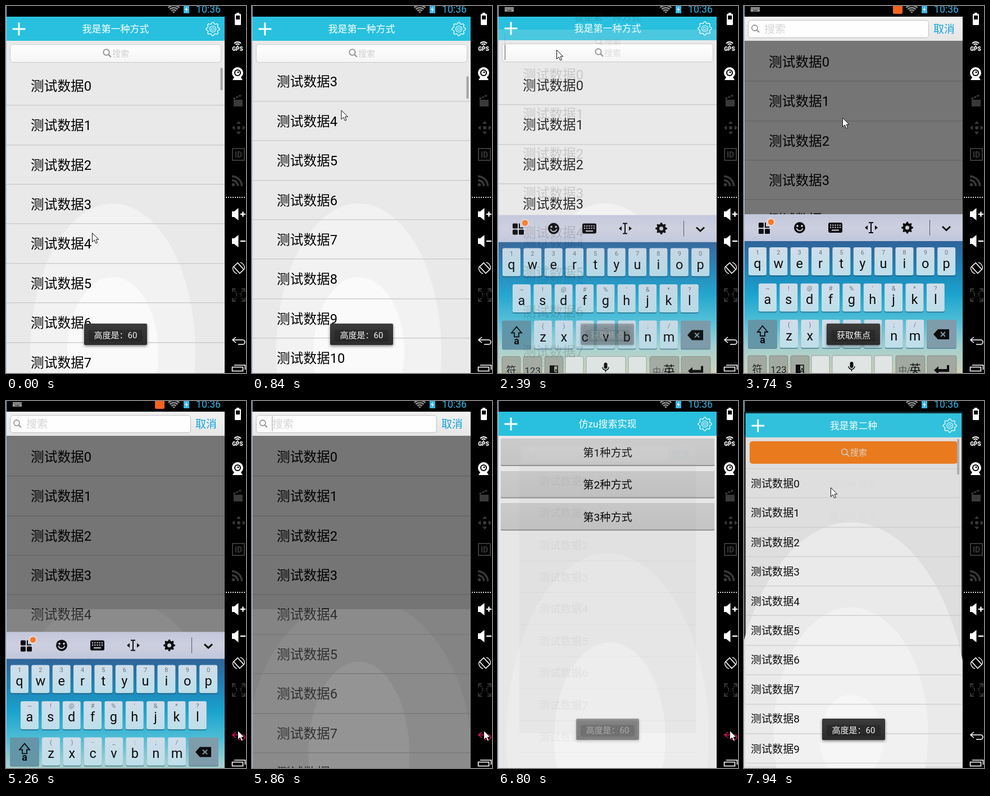
Animation, 427 px wide and 654 px high, one loop 8 s. Source, as an HTML page with a canvas:

```html
<!DOCTYPE html>
<html lang="zh-CN">
<head>
<meta charset="utf-8">
<title>Search bar demo</title>
<style>
html, body { margin: 0; width: 100%; height: 100%; overflow: hidden; background: #000; }
canvas { display: block; width: 427px; height: 654px; }
</style>
</head>
<body>
<canvas id="stage" width="427" height="654"></canvas>
<script>
const g = document.getElementById('stage').getContext('2d');
const FONT = 'Roboto, "Noto Sans CJK SC", "Noto Sans CJK", sans-serif';
// The traditional face centres the full-width colon.
const TOAST_FONT = 'Roboto, "Noto Sans CJK TC", "Noto Sans CJK", sans-serif';
const LOOP = 8000, TAU = Math.PI * 2;

// The screen refreshes only at these moments.
const TICKS = [0, 120, 260, 400, 540, 680, 820, 960, 1100, 1260, 1410, 1540, 1680, 1820, 1960,
  2100, 2240, 2390, 2540, 2680, 2810, 3210, 3740, 3880, 4020, 4160, 4300, 4440, 4580, 4730,
  5260, 5410, 5560, 5710, 5860, 6000, 6130, 6400, 6530, 6660, 6800, 6940, 7080, 7220, 7370,
  7520, 7660, 7800, 7940];

const POINTER = [[60, 153, 404], [680, 158, 91], [1260, 160, 482], [1410, 160, 482],
  [1960, 104, 78], [2390, 104, 78], [2810, 175, 199], [3740, 175, 199], [4730, 412, 587],
  [6800, 412, 587], [7370, 154, 154]];

const ramp = (t, a, b) => Math.min(1, Math.max(0, (t - a) / (b - a)));
const easeOut = u => 1 - (1 - u) ** 2;

function along(path, t) {
  let a = path[0];
  for (const b of path) {
    if (t < b[0]) {
      const u = ramp(t, a[0], b[0]);
      return [a[1] + (b[1] - a[1]) * u, a[2] + (b[2] - a[2]) * u];
    }
    a = b;
  }
  return [a[1], a[2]];
}

function box(x, y, w, h, fill) {
  g.fillStyle = fill;
  g.fillRect(x, y, w, h);
}
function round(x, y, w, h, r, fill, line) {
  g.beginPath();
  g.roundRect(x, y, w, h, r);
  if (fill) { g.fillStyle = fill; g.fill(); }
  if (line) { g.strokeStyle = line; g.lineWidth = 1; g.stroke(); }
}
function oval(x, y, rx, ry, fill) {
  g.beginPath();
  g.ellipse(x, y, rx, ry, 0, 0, TAU);
  g.fillStyle = fill;
  g.fill();
}
function poly(pts, fill) {
  g.beginPath();
  for (let i = 0; i < pts.length; i += 2) g.lineTo(pts[i], pts[i + 1]);
  g.closePath();
  g.fillStyle = fill;
  g.fill();
}
function line(pts, color, w = 1) {
  g.beginPath();
  for (let i = 0; i < pts.length; i += 2) g.lineTo(pts[i], pts[i + 1]);
  g.strokeStyle = color;
  g.lineWidth = w;
  g.stroke();
}
function arc(x, y, r, a, b, color, w) {
  g.beginPath();
  g.arc(x, y, r, a, b);
  g.strokeStyle = color;
  g.lineWidth = w;
  g.stroke();
}
function text(s, x, y, size, color, align = 'left', weight = 400, font = FONT) {
  g.font = `${weight} ${size}px ${font}`;
  g.textAlign = align;
  g.fillStyle = color;
  g.fillText(s, x, Math.round(y + size * 0.37));
}
function fade(stops, y0, y1) {
  const f = g.createLinearGradient(0, y0, 0, y1);
  stops.forEach((c, i) => f.addColorStop(i / (stops.length - 1), c));
  return f;
}
function layer(alpha, draw) {
  if (alpha <= 0) return;
  g.save();
  g.globalAlpha *= alpha;
  draw();
  g.restore();
}
function clip(x, y, w, h) {
  g.beginPath();
  g.rect(x, y, w, h);
  g.clip();
}
function zoom(s) {
  g.translate(195, 327);
  g.scale(s, s);
  g.translate(-195, -327);
}

function gear(x, y, r, teeth, depth) {
  g.beginPath();
  for (let i = 0; i < teeth * 4; i++) {
    const a = (i - 0.5) / (teeth * 4) * TAU, d = i % 4 < 2 ? r : r - depth;
    g.lineTo(x + d * Math.cos(a), y + d * Math.sin(a));
  }
  g.closePath();
}
function lens(x, y, r, color, w) {
  arc(x, y, r, 0, TAU, color, w);
  line([x + r * 0.7, y + r * 0.7, x + r * 1.6, y + r * 1.6], color, w + 0.5);
}

function titleBar(title) {
  box(1, 19, 388, 43, '#28c0de');
  line([11.5, 41, 34.5, 41], '#fff', 3);
  line([23, 29.5, 23, 52.5], '#fff', 3);
  gear(368, 41, 12, 8, 2.5);
  g.strokeStyle = '#fff';
  g.lineWidth = 1.3;
  g.stroke();
  arc(368, 41, 5.5, 0, TAU, '#fff', 1.2);
  arc(368, 41, 2.5, 0, TAU, '#fff', 1);
  text(title, 195, 41, 17, '#fff', 'center');
}

function rows(x, y, pitch, size, count, ink, rule) {
  for (let i = 0; i < count; i++) {
    const cy = y + i * pitch;
    text('测试数据' + i, x, cy, size, ink);
    if (rule) box(1, Math.round(cy + pitch / 2 - 1), 388, 1.5, rule);
  }
}

function firstPage(scroll, shift, ink, focused) {
  box(1, 19, 388, 635, '#e9e9e9');
  oval(190, 617, 147, 265, '#f2f2f2');
  oval(190, 617, 81, 134, '#fafafa');
  g.save();
  clip(1, 105 + shift, 388, 560);
  rows(44, 142 + shift - scroll, 70.4, 23.7, 16, ink, '#cdcdcd');
  g.restore();
  if (!focused) round(381.5, 110 + scroll * 0.07, 4, 40, 1.5, '#a6a6a6');
  g.save();
  g.translate(0, shift);
  titleBar('我是第一种方式');
  round(7.5, 68.5, 375, 32, 5, fade(['#fff', '#f5f5f5'], 68, 100), '#c9c9c9');
  lens(178.5, 82.5, 5.2, '#999', 2);
  text('搜索', 189, 84, 15, focused ? '#dcdcdc' : '#cfcfcf');
  if (focused) box(12, 70, 1, 27, '#555');
  g.restore();
}

function focusGhost() {
  box(1, 42, 388, 20, '#e9e9e9');
  text('我是第一种方式', 195, 20, 17, '#333', 'center');
  text('搜索', 189, 63, 15, '#888');
  lens(178.5, 62, 5.2, '#888', 2);
  box(12, 50, 1, 20, '#333');
  rows(44, 122, 70.4, 23.7, 8, '#333');
}

function searchPage(t, caret) {
  box(1, 62, 388, 592, '#757575');
  rows(44, 99, 70.4, 23.7, 9, '#000', '#666');
  if (t < 6000) {
    g.save();
    clip(1, 371, 388, 283);
    box(1, 371, 388, 283, '#848484');
    oval(190, 630, 200, 280, '#8b8b8b');
    oval(190, 630, 90, 166, '#949494');
    rows(44, 99, 70.4, 23.7, 9, '#303030', '#7a7a7a');
    g.restore();
  }
  box(1, 19, 388, 43, fade(['#f2f2f2', '#e6e6e6'], 19, 62));
  round(7.5, 25.5, 321, 31, 5, '#fefefe', '#bdbdbd');
  lens(19, 39, 5, '#999', 1.8);
  text('搜索', 36, 41, 19, '#d4d4d4');
  text('取消', 337, 41, 19, '#12a3dc');
  if (caret) box(35.5, 27, 1, 27, '#999');
}

function menuPage() {
  box(1, 19, 388, 635, '#e7e7e7');
  oval(195, 600, 180, 328, '#ececec');
  oval(199, 600, 99, 170, '#f3f3f3');
  titleBar('仿zu搜索实现');
  for (let i = 0; i < 3; i++) {
    const y = 67.5 + i * 57.5;
    round(5, y, 380, 48.5, 2, '#929292');
    round(5, y, 380, 46.5, 2, fade(['#cbcbcb', '#c4c4c4'], y, y + 46));
    text(`第${i + 1}种方式`, 195, y + 24, 19.2, '#000', 'center');
  }
}

function secondPage() {
  box(1, 19, 388, 635, '#e8e8e8');
  oval(190, 600, 215, 385, '#ebebeb');
  oval(190, 595, 139, 227, '#f2f2f2');
  oval(191, 604, 57, 79, '#f7f7f7');
  titleBar('我是第二种');
  round(8, 69, 374, 40.5, 5, '#ea7514');
  lens(178.5, 88, 5.2, '#c9c3bd', 2);
  text('搜索', 189, 89.5, 15, '#ddd8d2');
  box(1, 117.5, 388, 1.2, '#cfcfcf');
  rows(10, 144.5, 53.1, 19.3, 10, '#000', '#cfcfcf');
  round(381, 65, 4, 64, 1.5, '#aaa');
}

function statusBar(t) {
  box(1, 0, 388, 19, '#000');
  for (let i = 0; i < 4; i++) arc(298.5, 13, 2 + i * 4, -2.35, -0.79, '#8d8d8d', 2.6);
  box(316, 0, 10, 13, '#33b5e5');
  poly([322, 1, 318, 7, 321, 7, 319.5, 12, 324, 5.5, 321, 5.5], '#e8f7fd');
  text('10:36', 338, 5.6, 17.7, '#33b5e5');
  if (t >= 2240 && t < 5410) {
    box(12, 2, 16, 8, '#a0a0a0');
    for (let i = 0; i < 10; i++) box(13.5 + i % 5 * 3, 3.5 + (i / 5 | 0) * 2, 1.2, 1, '#000');
    box(16, 7.6, 8, 1, '#000');
  }
  if (t >= 2540 && t < 5410) round(265, -2, 17, 16, 2, '#f4631e');
}

function key(x, y, w, label, hint, fill) {
  round(x, y + 1, w, 51, 3, 'rgba(20,60,90,.45)');
  round(x, y, w, 50, 3, fill || fade(['#d0dde9', '#bddfea'], y, y + 50));
  const cx = x + w / 2;
  if (hint) text(hint, cx, y + 8.5, 11, '#667986', 'center');
  if (label) text(label, cx, y + 28, 23.5, '#0b0b0b', 'center');
}

function keyboard() {
  const PITCH = 37.35, W = 32;
  box(1, 419, 388, 240,
    fade(['#2f6399', '#2080b4', '#1aa3cd', '#4dbdd6', '#a3d0d0', '#cfd0b6'], 419, 654));
  box(1, 371, 388, 48, fade(['#c3c7db', '#cdcfdf', '#c0c7dc'], 371, 419));

  const ink = '#0c0c0c', tray = '#cbcddd';
  for (const [x, y] of [[26, 386], [26, 397], [37, 397]]) round(x, y, 9, 9, 1.5, ink);
  line([38, 386, 38, 394, 45, 394], ink, 2);
  oval(48, 385, 6.5, 6.5, '#fff');
  oval(48, 385, 5.5, 5.5, '#f47a2c');
  oval(99, 395, 10, 10, ink);
  oval(95, 392, 1.8, 2, tray);
  oval(103, 392, 1.8, 2, tray);
  arc(99, 395, 5.5, 0.2, 2.94, tray, 2);
  round(150, 386, 25, 18, 3, ink);
  for (let i = 0; i < 10; i++) box(153 + i % 5 * 4.2, 389.5 + (i / 5 | 0) * 4, 2.2, 2, tray);
  box(156, 398.5, 13, 2, tray);
  line([222, 386, 230, 386], ink, 2);
  line([226, 386, 226, 404], ink, 2);
  line([222, 404, 230, 404], ink, 2);
  poly([215, 395, 220, 391, 220, 399], ink);
  poly([238, 395, 233, 391, 233, 399], ink);
  gear(290.5, 395, 10.5, 8, 2.5);
  g.fillStyle = ink;
  g.fill();
  oval(290.5, 395, 3.5, 3.5, tray);
  box(330, 381, 1, 28, '#555');
  line([353, 393, 360, 399.5, 367, 393], ink, 3);

  [...'qwertyuiop'].forEach((c, i) => key(8 + i * PITCH, 430, W, c, '1234567890'[i]));
  [...'asdfghjkl'].forEach((c, i) => key(26 + i * PITCH, 494.5, W, c, "~!@#%'&*?"[i]));
  [...'zxcvbnm'].forEach((c, i) => key(64 + i * PITCH, 559, W, c, '()-_:;/'[i]));
  key(7, 559, 52, '', '', '#6496a8');
  g.beginPath();
  [33, 570, 42, 581, 37, 581, 37, 588, 29, 588, 29, 581, 24, 581].forEach((v, i, p) => {
    if (i % 2) g.lineTo(p[i - 1], v);
  });
  g.closePath();
  g.strokeStyle = ink;
  g.lineWidth = 1.8;
  g.stroke();
  text('a', 33, 594, 18, ink, 'center', 700);
  const del = '#7f9cab';
  key(325, 559, 53, '', '', del);
  poly([337, 585, 345, 576, 365, 576, 365, 594, 345, 594], ink);
  line([350, 581, 358, 589], del, 2);
  line([358, 581, 350, 589], del, 2);

  const y = 623;
  for (const [x, w, dark] of [[7, 33, 1], [45, 33, 1], [83, 33, 1], [120, 32], [157, 70],
    [232, 32], [270, 52, 1], [326, 52, 1]]) {
    round(x, y, w, 50, 3, dark ? '#a2a9a1' : '#e0e5e4', 'rgba(90,110,110,.5)');
  }
  text('符', 23.5, 647, 18, '#222', 'center');
  text('123', 61.5, 648, 17, '#222', 'center');
  box(92, 639, 8, 17, ink);
  text('A', 99, 649, 13, ink);
  line([100, 640, 106, 640, 106, 656], ink, 1.5);
  round(188.5, 634, 6, 11, 3, ink);
  arc(191.5, 642, 5.5, 0, Math.PI, ink, 1.5);
  line([191.5, 647, 191.5, 651], ink, 1.5);
  text('中/', 275, 648, 15, '#555');
  text('英', 294, 646, 21, ink, 'left', 500);
  poly([338, 649, 346, 642, 346, 647, 361, 647, 361, 640, 365, 640, 365, 652, 346, 652, 346, 656], ink);
}

function toast(label, x, w) {
  g.save();
  g.shadowColor = 'rgba(0,0,0,.5)';
  g.shadowBlur = 5;
  g.shadowOffsetY = 2;
  round(x, 566, w, 38, 2, fade(['#3b3b3b', '#2c2c2c'], 566, 604));
  g.restore();
  round(x + 8, 577, w - 16, 21, 4, 'rgba(20,20,20,.3)');
  text(label, 195, 586, 15, '#f4f4f4', 'center', 400, TOAST_FONT);
}

function speaker(y, plus) {
  poly([402, y - 5, 406, y - 5, 413.5, y - 11, 413.5, y + 11, 406, y + 5, 402, y + 5], '#fff');
  line([417, y, 426, y], '#fff', 2.4);
  if (plus) line([421.5, y - 4.5, 421.5, y + 4.5], '#fff', 2.4);
}

function sidePanel(hot) {
  const on = '#fff', off = '#393939';
  box(389, 0, 38, 654, '#000');
  box(410, 12, 5, 3, on);
  round(407, 14, 11, 20, 1.5, on);
  box(409, 17, 7, 7, '#000');
  for (const r of [1, 4.5, 8]) arc(412, 72, r, -2.4, -0.74, on, 2);
  text('GPS', 412, 76.5, 10, on, 'center', 900);
  oval(412, 119, 10, 10, on);
  oval(412, 119, 6, 6, '#000');
  oval(412, 119, 4, 4, on);
  oval(413, 118, 1.5, 1.5, '#000');
  poly([406, 127, 418, 127, 421, 132, 403, 132], on);

  box(405, 167, 16, 12, off);
  poly([404, 164, 419, 157, 420, 160, 405, 167], off);
  for (let i = 0; i < 3; i++) line([407 + i * 5, 161 - i * 2, 410 + i * 5, 165 - i * 2], '#000', 1.5);
  for (let i = 0; i < 4; i++) {
    g.save();
    g.translate(414, 217);
    g.rotate(i * TAU / 4);
    poly([0, -12, 4, -7, -4, -7], off);
    g.restore();
  }
  oval(414, 217, 3, 3, off);
  g.strokeStyle = off;
  g.lineWidth = 2;
  g.strokeRect(403, 254, 21, 21);
  text('ID', 413.5, 264.5, 14, off, 'center', 700);
  oval(404.5, 318.5, 2.8, 2.8, off);
  arc(402, 321, 10.5, -TAU / 4, 0, off, 3.5);
  arc(402, 321, 17.5, -TAU / 4, 0, off, 3.5);
  for (let x = 391; x < 427; x += 4) box(x, 340, 2, 2, '#ddd');

  speaker(371, true);
  speaker(419, false);
  g.save();
  g.translate(414, 467);
  g.rotate(-0.75);
  g.strokeStyle = on;
  g.lineWidth = 1.6;
  g.strokeRect(-5, -8, 10, 16);
  g.restore();
  arc(414, 467, 10.5, -1.3, 0.2, on, 1.3);
  arc(414, 467, 10.5, 1.85, 3.35, on, 1.3);
  for (const [sx, sy] of [[-1, -1], [1, -1], [-1, 1], [1, 1]]) {
    const x = 414 + sx * 11, y = 515 + sy * 11;
    line([x - sx * 6, y, x, y, x, y - sy * 6], off, 1.8);
    line([x, y, x - sx * 6, y - sy * 6], off, 1.5);
  }
  text('1:1', 414, 515, 9, off, 'center', 700);

  const back = hot ? '#e2125f' : on;
  line([409, 590, 403, 595, 409, 600], back, 1.6);
  line([403, 595, 421, 595], back, 1.6);
  arc(421, 599, 4, -TAU / 4, TAU / 4, back, 1.6);
  line([421, 603, 413, 603], back, 1.6);
  g.strokeStyle = on;
  g.lineWidth = 1.6;
  g.strokeRect(402.5, 643.5, 19, 7);
  line([406, 640, 425.5, 640, 425.5, 648], on, 1.6);
}

function arrow(x, y) {
  g.save();
  g.translate(x + 0.5, y + 0.5);
  poly([0, 0, 0, 16, 3.8, 12.4, 6.4, 18.4, 9, 17.3, 6.5, 11.5, 11.5, 11.5], '#fff');
  g.strokeStyle = '#111';
  g.lineWidth = 1;
  g.stroke();
  g.restore();
}

function screen(t, pointerY) {
  const caret = t > 5300 || Math.floor((t - 3210) / 530) % 2 === 0;
  const focusing = t >= 2390 && t < 2540;
  if (t < 6380) {
    const scroll = t < 1260 ? Math.max(0, 404 - pointerY) : 0;
    if (t < 2810) {
      firstPage(scroll, -43 * ramp(t, 2383, 2680), focusing ? '#2b2b2b' : '#000', t >= 2240);
    }
    layer(ramp(t, 2540, 2810), () => searchPage(t, caret));
  } else {
    menuPage();
    const out = easeOut(ramp(t, 6380, 6920));
    layer(1 - out, () => { zoom(1 - 0.2 * out); searchPage(t, true); });
    const into = easeOut(ramp(t, 7560, 8054));
    layer(into * 0.8, () => box(0, 19, 389, 635, '#000'));
    layer(into, () => { zoom(0.8 + 0.2 * into); secondPage(); });
  }
  statusBar(t);

  const up = ramp(t, 2080, 2390), down = ramp(t, 5200, 5620);
  if (up > 0 && down < 1) {
    layer(t < 2540 ? 0.95 : 1, () => {
      g.translate(0, 283 * (1 - up + down) + (t < 2540 ? 1.5 : 0));
      keyboard();
    });
  }
  if (focusing) layer(0.18, focusGhost);
  layer(1 - ramp(t, 1260, 1440), () => toast('高度是：60', 139, 112));
  layer(ramp(t, 2345, 2495) * (1 - ramp(t, 3860, 4200)), () => toast('获取焦点', 147, 95));
  layer(ramp(t, 6700, 6930), () => toast('高度是：60', 139, 112));
}

function draw(now) {
  const clock = now % LOOP;
  const t = TICKS.filter(v => v <= clock).pop() || 0;
  const [px, py] = along(POINTER, t);
  box(0, 0, 427, 654, '#000');
  box(0, 0, 1, 654, '#a9c9ee');
  g.save();
  clip(0, 0, 389, 654);
  screen(t, py);
  g.restore();
  sidePanel(px > 398 && py > 580);
  arrow(px, py);
}

const start = performance.now();
function loop() {
  draw(performance.now() - start);
  requestAnimationFrame(loop);
}
loop();
</script>
</body>
</html>
```
